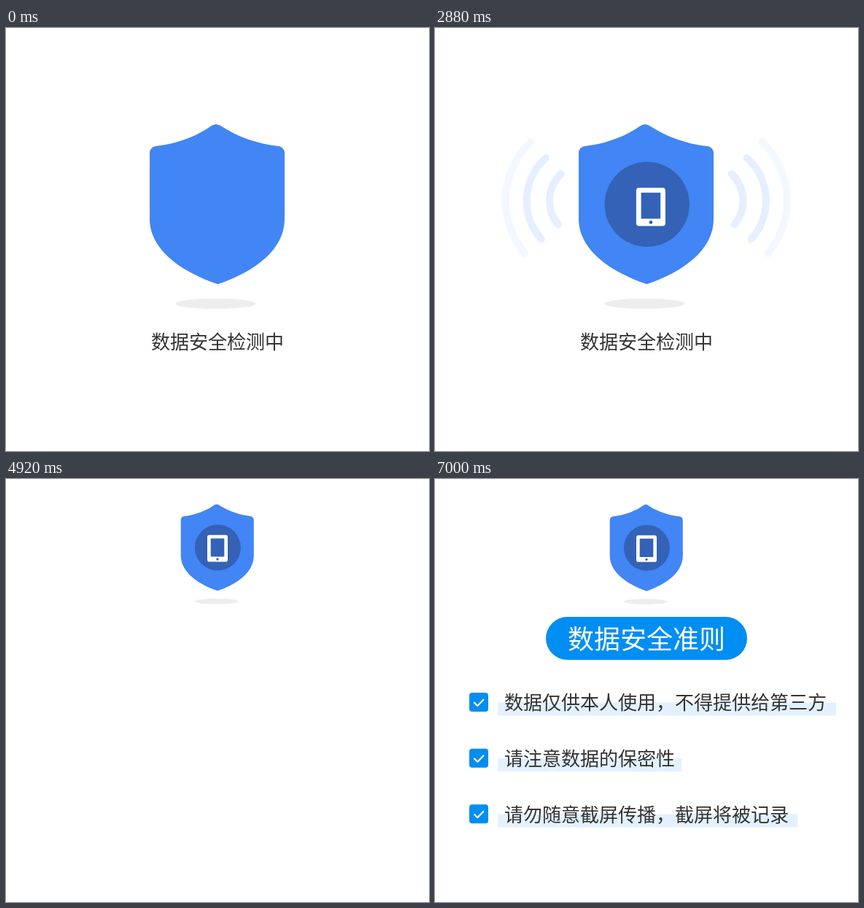
Write an HTML page that moves like this. It is 580x580 px and loops after 9.88 s.

```html
<!DOCTYPE html>
<html lang="zh-CN">
<head>
<meta charset="utf-8">
<style>
  html, body { margin: 0; width: 100%; height: 100%; overflow: hidden; background: #fff; }
  svg { display: block; width: 100vw; height: 100vh; }
  text { font-family: "Noto Sans CJK SC", "Noto Sans CJK", sans-serif; font-size: 26px; fill: #333; }
  #title text { font-size: 36px; font-weight: 500; fill: #fff; }
  .wave { fill: none; stroke: #e6efff; stroke-width: 10; stroke-linecap: round; }
  .tick { fill: none; stroke: #fff; stroke-width: 2.3; stroke-linecap: round; stroke-linejoin: round; }
</style>
</head>
<body>
<svg viewBox="0 0 580 580">
  <g id="waves"></g>
  <g id="badge">
    <path fill="#4285f4" d="M281 134.6Q288 129.4 295 134.6C318 149.5 345 159 373 162C378.5 162.6 382 166.5 382 171.5V262C382 304 341 334 290.5 351.3C239 334 197 303 197 262V171.5C197 166.5 200.5 162.6 206 162C232 159.3 260 149.5 281 134.6Z"/>
    <ellipse cx="287.3" cy="378" rx="55" ry="7" fill="#ededed"/>
    <circle id="disc" cx="290.7" cy="241.8" r="58.2" fill="#3462b7"/>
  </g>
  <g id="phone" fill="#fff">
    <path fill-rule="evenodd" d="M-16-26.2H16Q20-26.2 20-22.2V22.2Q20 26.2 16 26.2H-16Q-20 26.2-20 22.2V-22.2Q-20-26.2-16-26.2ZM-13.3-19.5V16.3H13.3V-19.5ZM-2.4 21.2A2.4 2.4 0 1 0 2.4 21.2A2.4 2.4 0 1 0-2.4 21.2Z"/>
  </g>
  <text id="status" x="199" y="439.5">数据安全检测中</text>
  <g id="title">
    <rect x="152" y="189" width="276" height="59" rx="29.5" fill="#008ef2"/>
    <text x="182" y="232.5">数据安全准则</text>
  </g>
  <g id="rules"></g>
</svg>
<script>
const LOOP = 9880, STEP = 40;
const $ = id => document.getElementById(id);
const clamp = v => Math.max(0, Math.min(1, v));
const progress = (t, from, to) => clamp((t - from) / (to - from));
const mix = (a, b, p) => a + (b - a) * p;
const smooth = p => p * p * (3 - 2 * p);
const fade = (el, alpha) => el.setAttribute('opacity', alpha.toFixed(3));
const place = (el, x, y, s = 1) => el.setAttribute('transform', `translate(${x} ${y}) scale(${s})`);

// Each wave: upper x, lower x, top, bottom, radius; mirrored on the right.
const waves = [
  [173, 169, 200, 269.5, 50.7],
  [152, 146, 178, 289.5, 78.7],
  [131, 123, 156, 309, 112.5]
];
$('waves').innerHTML = waves.map(([x1, x2, y1, y2, r]) => {
  const d = `M${x1} ${y1}A${r} ${r} 0 0 0 ${x2} ${y2}`;
  return `<g class="wave"><path d="${d}"/><path d="${d}" transform="matrix(-1 0 0 1 579.5 0)"/></g>`;
}).join('');

const rules = [
  { y: 293, right: 550, from: 5520, to: 6120, text: '数据仅供本人使用，不得提供给第三方' },
  { y: 369.7, right: 338, from: 6040, to: 6580, text: '请注意数据的保密性' },
  { y: 446.2, right: 497, from: 6580, to: 7000, text: '请勿随意截屏传播，截屏将被记录' }
];
$('rules').innerHTML = rules.map(({ y, right, text }) => `<g transform="translate(0 ${y})">
  <rect x="86" y="13.4" width="${right - 86}" height="18" fill="#e3f1fe"/>
  <rect x="47" width="26" height="26" rx="4" fill="#008ef2"/>
  <path class="tick" d="M54 13.8L58.3 18L66.3 9.8"/>
  <text x="95" y="23.3">${text}</text></g>`).join('');

const waveEls = [...$('waves').children], ruleEls = [...$('rules').children];

function lift(t) {
  const d = t - 4280;
  if (d <= 0) return 0;
  if (d > 660) return 169.5;
  const k = 0.0083, w = Math.PI / 230;
  return 169.5 * (1 - Math.exp(-k * d) * (Math.cos(w * d) + k / w * Math.sin(w * d)));
}

function outerWave(t) {
  if (t < 1560) return 0;
  if (t < 2520) return 1 - progress(t, 1720, 2120);
  return 1 - progress(t, 2680, 3080);
}

function render(t) {
  const enter = progress(t, 160, 600);
  const shrink = smooth(progress(t, 3560, 4280));
  const leave = 1 - progress(t, 3560, 3840);
  const scale = mix(1, 0.541, shrink), up = lift(t);
  const dx = -19 * (1 - enter), dy = -17 * (1 - enter);

  place($('badge'), 290 * (1 - scale), 290 * (1 - scale) - up, scale);
  place($('disc'), dx, dy);
  fade($('disc'), enter);

  const angle = 1.5 * Math.PI * progress(t, 2480, 3560);
  const px = 290 + 6 * Math.sin(angle), py = 244.2 - 6 * Math.cos(angle);
  place($('phone'), mix(px, 290, shrink) + dx, mix(py, 265, shrink) + dy - up, mix(1, 0.7, shrink));
  fade($('phone'), enter);

  fade(waveEls[0], t >= 840 ? leave : 0);
  fade(waveEls[1], t >= 1200 ? leave : 0);
  fade(waveEls[2], outerWave(t));
  fade($('status'), leave);
  fade($('title'), progress(t, 4920, 5480));
  rules.forEach(({ from, to }, i) => fade(ruleEls[i], progress(t, from, to)));
}

const start = performance.now();
function tick() {
  const t = (performance.now() - start) % LOOP;
  render(Math.floor(t / STEP) * STEP);
  requestAnimationFrame(tick);
}
render(0);
requestAnimationFrame(tick);
</script>
</body>
</html>
```
